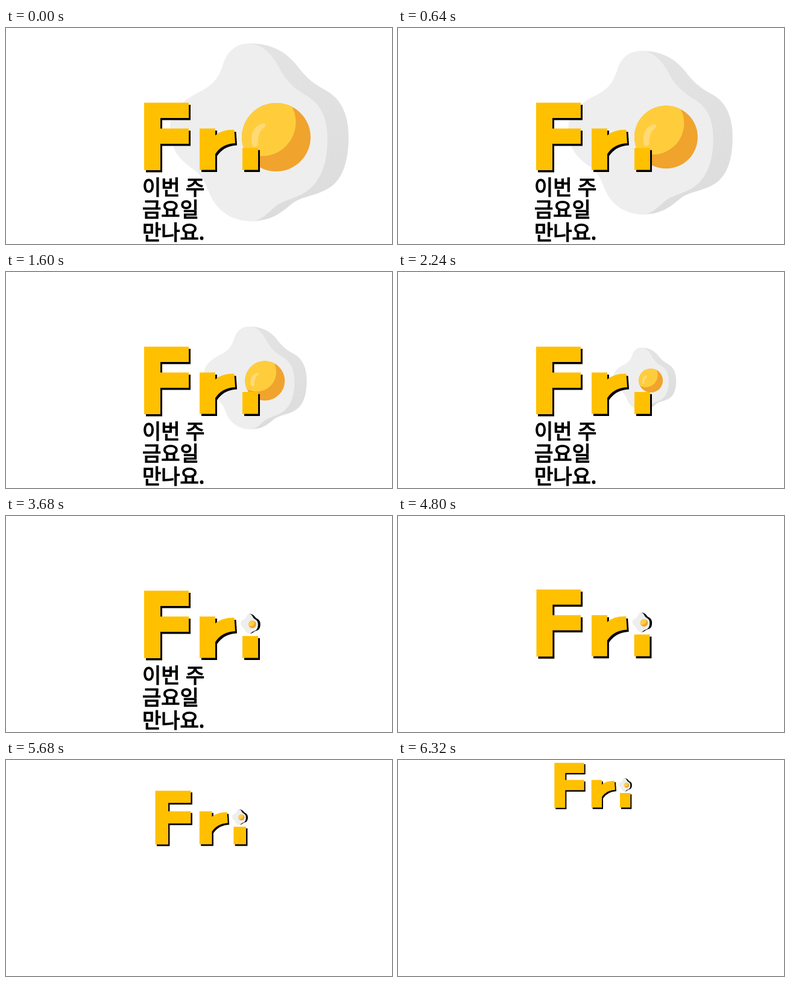
An HTML page for the animation above (6560 ms loop, 640x360 px).

```html
<!DOCTYPE html>
<html lang="ko">
<head>
<meta charset="utf-8">
<style>
  html, body { margin: 0; width: 100%; height: 100%; overflow: hidden; background: #fff; }
  svg { display: block; width: 100%; height: 100%; }
  text { font: 400 34px "Noto Sans CJK KR", "Noto Sans CJK", sans-serif; stroke: #000; stroke-width: 1.4px; }
</style>
</head>
<body>
<svg viewBox="0 0 640 360">
  <defs>
    <path id="letters" d="M229 124.5H303V150H256V167.5H303V193H256V237H229Z
      M321 167.5H347V179Q358 169 378.5 169.5L380 192Q358 193 347 210V236.5H321Z
      M392 200H418V236.5H392Z"/>
    <linearGradient id="shade" gradientUnits="userSpaceOnUse" x1="0" y1="26" x2="0" y2="322">
      <stop stop-color="#e3e3e3"/><stop offset="1" stop-color="#dcdcdc"/>
    </linearGradient>
    <clipPath id="yolk"><circle cx="448" cy="182" r="57"/></clipPath>
  </defs>
  <g id="word">
    <g id="egg">
      <path id="side" d="M400 26C440 24 466 42 482 62C500 86 512 94 532 105C558 120 568 148 568 182
        C568 218 560 250 538 265C516 280 490 280 474 293C456 308 440 322 405 322Z"/>
      <path fill="#eee" d="M400 26C378 27 366 42 360 60C352 88 338 98 318 108C290 122 272 142 272 165
        C272 206 290 220 310 235C335 252 332 275 350 297C365 314 385 322 405 322
        C423 322 434 308 446 298C463 284 488 284 507 265C525 247 533 220 533 185
        C533 150 522 128 500 114C479 101 468 92 456 72C442 44 425 25 400 26Z"/>
      <circle cx="448" cy="182" r="57" fill="#f0a32d"/>
      <circle cx="424" cy="157" r="56.5" fill="#ffcd3c" clip-path="url(#yolk)"/>
      <path d="M409 197C403 178 412 160 428 159Q432 161 429 165C420 171 417 182 418 195Q413 200 409 197Z" fill="#ffda75"/>
    </g>
    <use href="#letters" x="3" y="3.5"/>
    <use href="#letters" fill="#ffc000"/>
  </g>
  <g id="caption">
    <text x="226" y="277.5">이번 주</text>
    <text x="226" y="315">금요일</text>
    <text x="226" y="352.5">만나요.</text>
  </g>
</svg>
<script>
  const LOOP = 6560, STEP = 80;
  const [word, egg, side, caption] = ["word", "egg", "side", "caption"].map(id => document.getElementById(id));
  const progress = (t, start, length) => Math.min(1, Math.max(0, (t - start) / length));
  const mix = (a, b, p) => a + (b - a) * p;

  // Scale about (cx, cy) while moving that point to (x, y)
  const place = (el, cx, cy, x, y, s) =>
    el.setAttribute("transform", `translate(${x} ${y}) scale(${s}) translate(${-cx} ${-cy})`);

  function draw(now) {
    const t = Math.floor((now % LOOP) / STEP) * STEP;
    const shrink = progress(t, 415, 2500);
    const rise = progress(t, 4775, 1480);
    place(egg, 448, 182, mix(448, 408.5, shrink), mix(182, 180.5, shrink), mix(1, 0.11, shrink));
    place(word, 320, 125, 320, mix(125, 5, rise), mix(1, 2 / 3, rise));
    side.setAttribute("fill", t < 3680 ? "url(#shade)" : "#000");
    caption.setAttribute("visibility", t < 4800 ? "visible" : "hidden");
  }

  const start = performance.now();
  (function tick() {
    draw(performance.now() - start);
    requestAnimationFrame(tick);
  })();
</script>
</body>
</html>
```
